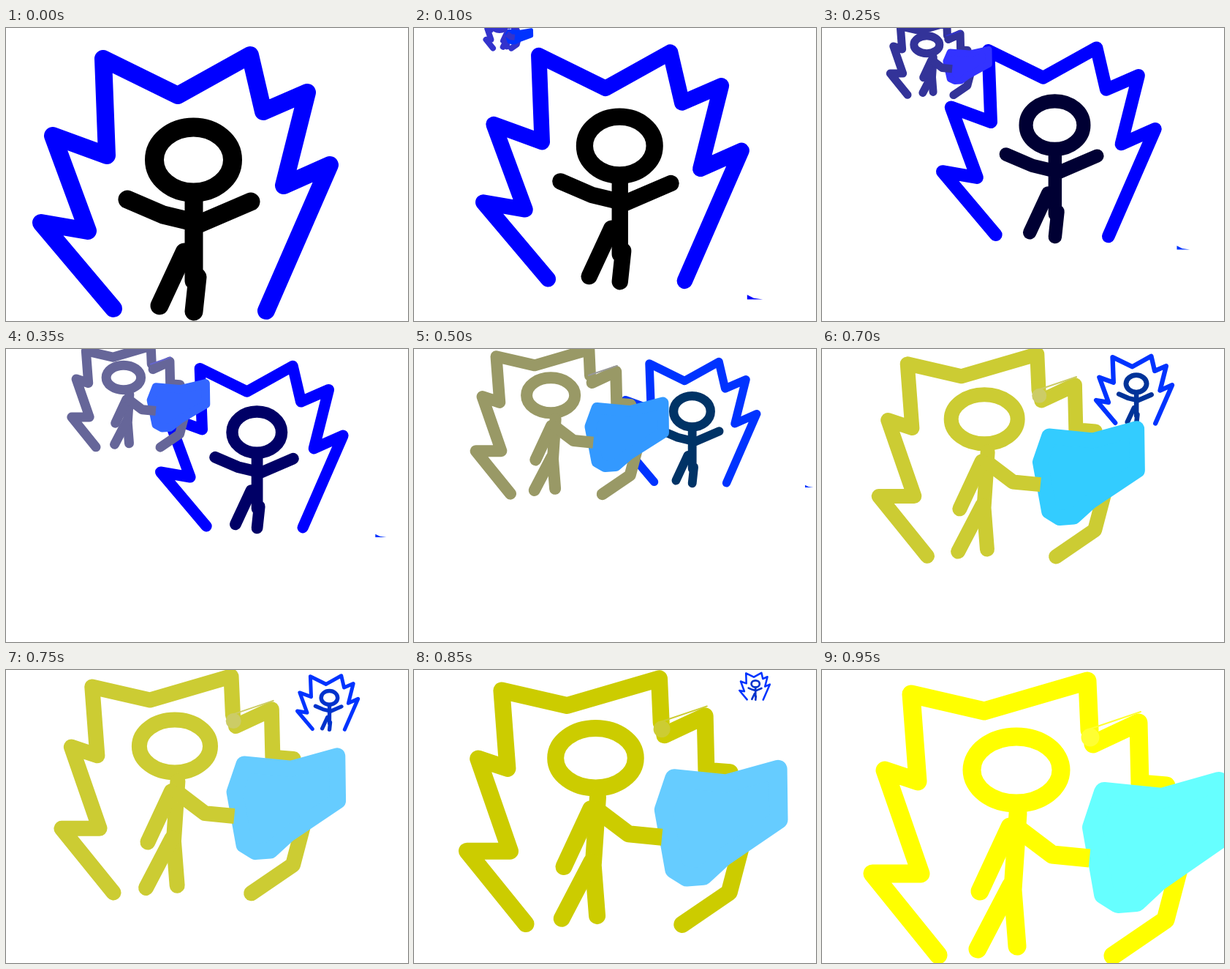
Recreate the animation shown at these times as an HTML page with a canvas. Size 550x400 px, loop 1000 ms.

```html
<!DOCTYPE html>
<html lang="en">
<head>
<meta charset="utf-8">
<title>Aura morph</title>
<style>
html, body { margin: 0; width: 100%; height: 100%; overflow: hidden; background: #fff; }
canvas { display: block; }
</style>
</head>
<body>
<canvas id="stage" width="550" height="400"></canvas>
<script>
const ctx = document.getElementById('stage').getContext('2d');
const STEPS = 20, STEP_MS = 50, LAST = STEPS - 1;

const pts = s => s.split(' ').map(p => p.split(',').map(Number));
const lerp = (a, b, p) => a + (b - a) * p;
const mix = (a, b, p) => a.map((v, i) => lerp(v, b[i], p));

// Colours snap to the 51-step palette
const rgb = c => `rgb(${c.map(v => Math.min(255, Math.round(v / 51) * 51))})`;

const blue = {
  aura: pts('147,383 48,266 112,277 64,147 138,174 133,42 235,92 334,37 352,114 412,88 380,215 443,187 356,386'),
  limbs: [
    pts('166,234 215,255 265,267 335,237'),
    pts('257,225 257,345'),
    pts('244,306 210,379'),
    pts('262,340 257,387')
  ]
};

const gold = {
  aura: [
    pts('159,389 69,278 135,278 86,137 131,152 122,33 222,56 363,15 366,82'),
    pts('371,101 433,72 435,155 471,158'),
    pts('490,265 470,341 398,390')
  ],
  limbs: [
    pts('268,196 261,300 267,377'),
    pts('258,295 213,381'),
    pts('257,214 216,302')
  ],
  arm: pts('262,212 315,252 366,257'),
  blob: pts('386,167 465,175 543,153 544,230 460,288 430,316 405,318 386,306 370,215')
};

function trace(points) {
  ctx.beginPath();
  points.forEach(p => ctx.lineTo(...p));
}

function line(points, width, cap = 'round') {
  trace(points);
  ctx.lineWidth = width;
  ctx.lineCap = cap;
  ctx.stroke();
}

function ring(x, y, rx, ry, width) {
  ctx.beginPath();
  ctx.ellipse(x, y, rx, ry, 0, 0, 7);
  ctx.lineWidth = width;
  ctx.stroke();
}

// Shrinks towards the top right corner
function drawBlue(p) {
  const s = 1 - p, tint = [0, 60, 240];
  ctx.save();
  ctx.transform(s, 0, 0, s, 492 * p, 0);
  ctx.strokeStyle = rgb(mix([0, 0, 255], tint, p));
  line(blue.aura, 24);
  ctx.strokeStyle = rgb(mix([0, 0, 0], tint, p));
  ring(256.5, 180, 53.5, 44.5, 26);
  blue.limbs.forEach(l => line(l, 25));
  ctx.restore();
}

function drawChip(k) {
  const s = 1 - k / LAST, x = 436 + 9.9 * k, y = 416 - 22.7 * k;
  ctx.fillStyle = k < 4 ? '#00f' : '#03f';
  trace([[x, y], [x, y - 7 * s], [x + 10 * s, y - 2 * s], [x + 24 * s, y]]);
  ctx.fill();
}

// Every part grows out of its own seed point
function drawGold(p) {
  const base = mix([0, 0, 220], [255, 255, 0], p);
  const color = rgb(base), pale = rgb([base[0], base[1], base[2] + 51]);
  const width = lerp(6, 25, p);
  const grow = (points, seed) => points.map(c => mix(seed, c, p));
  const auraSeed = [102, -15], bodySeed = [111, -16];

  ctx.strokeStyle = color;
  gold.aura.forEach(l => line(grow(l, auraSeed), width));

  ctx.strokeStyle = pale;
  line(grow([[362, 82], [436, 57]], auraSeed), 2);
  if (p > 0.7) line(grow([[367, 92], [367, 92]], auraSeed), width);

  ctx.strokeStyle = color;
  ring(...mix([99.5, -18, 2, 0], [266, 136.5, 61, 45.5], p), width);
  gold.limbs.forEach(l => line(grow(l, bodySeed), width));

  const flat = gold.blob.map(c => [107 + (c[0] - 457) * 0.1, -15]);
  ctx.fillStyle = ctx.strokeStyle = rgb(mix([0, 0, 255], [102, 255, 255], p));
  trace(flat.map((c, i) => mix(c, gold.blob[i], p)));
  ctx.closePath();
  ctx.lineWidth = lerp(2, 28, p);
  ctx.fill();
  ctx.stroke();

  ctx.strokeStyle = color;
  line(grow(gold.arm, bodySeed), width, 'butt');
}

function render(time) {
  const k = Math.floor(time / STEP_MS) % STEPS;
  const p = k / LAST;
  ctx.fillStyle = '#fff';
  ctx.fillRect(0, 0, 550, 400);
  if (k < LAST) drawBlue(p);
  if (k < 12) drawChip(k);
  if (k) drawGold(p);
}

let start = null;
function tick(now) {
  if (start === null) start = now;
  render(now - start);
  requestAnimationFrame(tick);
}
ctx.lineJoin = 'round';
render(0);
requestAnimationFrame(tick);
</script>
</body>
</html>
```
